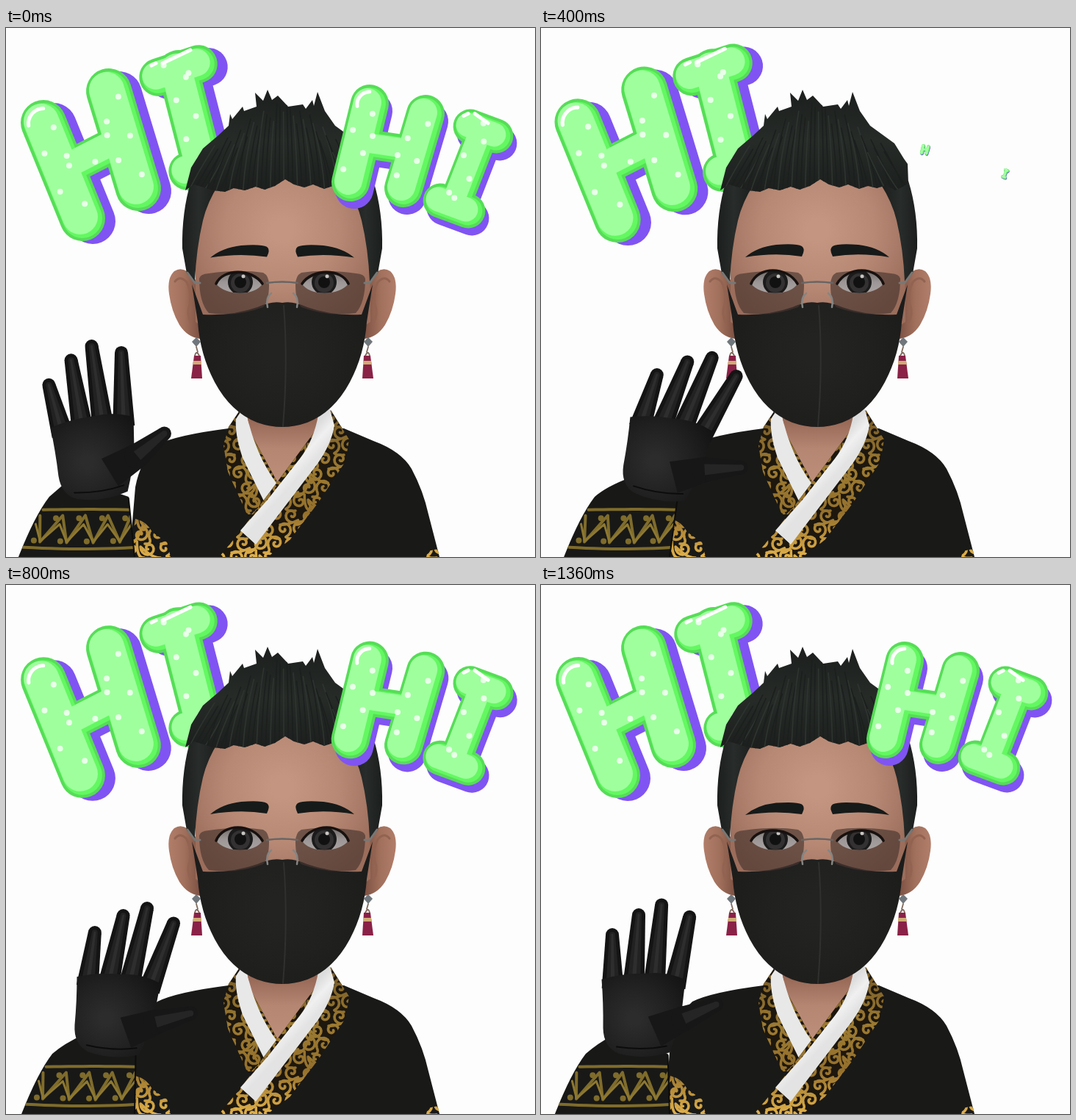
These frames come from a looping animation (720 px wide and 720 px high, 1440 ms). An HTML page with a canvas:

```html
<!DOCTYPE html>
<html lang="en">
<head>
<meta charset="utf-8">
<title>Hi hi</title>
<style>
html, body { margin: 0; width: 100%; height: 100%; overflow: hidden; background: #fdfdfd }
canvas { display: block; width: 720px; height: 720px }
</style>
</head>
<body>
<canvas id="stage" width="720" height="720"></canvas>
<script>
const ctx = document.getElementById('stage').getContext('2d');
const STEP = 80, FRAMES = 18, RAD = Math.PI / 180;
ctx.lineCap = ctx.lineJoin = 'round';

const shape = d => d instanceof Path2D ? d : new Path2D(d);
const fill = (d, color) => { ctx.fillStyle = color; ctx.fill(shape(d)); };
const line = (d, color, width) => { ctx.strokeStyle = color; ctx.lineWidth = width; ctx.stroke(shape(d)); };
const scoped = draw => { ctx.save(); draw(); ctx.restore(); };
const within = (d, draw) => scoped(() => { ctx.clip(shape(d)); draw(); });
const mix = (a, b, u) => a + (b - a) * u;
const both = draw => {
  draw(1);
  scoped(() => { ctx.translate(752, 0); ctx.scale(-1, 1); draw(-1); });
};
function disc(x, y, r, color) {
  ctx.beginPath();
  ctx.arc(x, y, r, 0, 7);
  ctx.fillStyle = color;
  ctx.fill();
}
function shade(gradient, colors) {
  colors.forEach((c, i) => gradient.addColorStop(i / (colors.length - 1), c));
  return gradient;
}
const radial = (x, y, r0, r1, ...colors) => shade(ctx.createRadialGradient(x, y, r0, x, y, r1), colors);
const linear = (x0, y0, x1, y1, ...colors) => shade(ctx.createLinearGradient(x0, y0, x1, y1), colors);

// Linear interpolation through [frame, value] pairs.
function keyed(frame, keys) {
  const i = Math.max(1, keys.findIndex(([at]) => at >= frame));
  const [t0, a] = keys[i - 1], [t1, b] = keys[i];
  return mix(a, b, (frame - t0) / (t1 - t0));
}

// ---- Bubble letters: each is two thick strokes joined by a thinner one ----
const LEFT = {
  start: 3, wide: 62, shadow: [14, 4],
  glyphs: [
    { at: [98, 185], ends: [[51, 129, 104, 259], [140, 86, 180, 218]] },
    { at: [285, 118], ends: [[207, 67, 262, 49], [247, 195, 290, 186]], slim: .83, bar: 56 }
  ]
};
const RIGHT = {
  start: 5, wide: 52, shadow: [5, 10],
  glyphs: [
    { at: [523, 166], ends: [[495, 103, 469, 210], [571, 117, 541, 218]] },
    { at: [632, 199], ends: [[632, 134, 667, 147], [591, 235, 629, 249]], slim: .9, bar: 44 }
  ]
};
const segment = ([x0, y0, x1, y1]) => `M${x0} ${y0}L${x1} ${y1}`;
const middle = ([x0, y0, x1, y1]) => [(x0 + x1) / 2, (y0 + y1) / 2];

// Springs from a speck to full size.
function pop(frames) {
  return frames < 0 ? 0 : 1 - .91 * Math.exp(-.9 * frames) * Math.cos(.85 * frames);
}

function drawLetter({ at: [x, y], ends, slim = 1, bar }, wide, shadow, size) {
  const thick = wide * slim, thin = bar || wide * .77;
  const join = [...middle(ends[0]), ...middle(ends[1])];
  const layer = (color, inset) => {
    ends.forEach(e => line(segment(e), color, thick - inset));
    line(segment(join), color, thin - inset);
  };
  scoped(() => {
    ctx.translate(x, y);
    ctx.scale(size, size);
    ctx.translate(-x, -y);
    scoped(() => { ctx.translate(...shadow); layer('#8054f2', 0); });
    layer('#56dd57', 0);
    layer('#63f861', 8);
    ctx.translate(-3, -2);
    layer('#9fff9d', 14);
    [...ends, join].forEach(([x0, y0, x1, y1]) => {
      const length = Math.hypot(x1 - x0, y1 - y0), count = Math.round(length / 30);
      for (let i = 0; i < count; i++) {
        const u = (i + .5) / count, side = (i % 2 ? 1 : -1) * thick * .2 / length;
        disc(mix(x0, x1, u) - (y1 - y0) * side, mix(y0, y1, u) + (x1 - x0) * side, 4, '#e9ffe9');
      }
    });
    const [x0, y0, x1, y1] = ends[0], r = thick * .33;
    const gloss = new Path2D();
    if (bar) {
      gloss.moveTo(x0 - 6, y0 - r + 3);
      gloss.lineTo(x0, y0 - r);
      gloss.moveTo(x0 + 9, y0 - r);
      gloss.lineTo(x1 - 8, y1 - r);
    } else gloss.arc(x0 + 3, y0 + 3, r, 3, 4.7);
    line(gloss, '#fff', 5);
  });
}

function drawWord({ start, wide, shadow, glyphs }, frame) {
  const size = pop((frame || FRAMES) - start);
  if (size) glyphs.forEach(g => drawLetter(g, wide, shadow, size));
}

// ---- Robe ----
const TORSO = 'M168 720L176 625Q183 588 206 567Q232 554 303 545H460L500 562Q538 576 552 600Q568 630 575 662L590 720Z';
const LAPEL_LEFT = 'M317 522L303 543L296 568L302 604L328 662L356 662L378 634Z';
const LAPEL_RIGHT = 'M442 520L467 560L462 590L425 646L386 697L356 720H290L320 684Z';

function curls(area, x0, y0, x1, y1) {
  const gold = linear(0, 540, 0, 720, '#7d6029', '#9c7a31', '#94702c', '#e0b04a');
  within(area, () => {
    let row = 0;
    for (let y = y0; y < y1; y += 19, row++)
      for (let x = x0 + row % 2 * 11; x < x1; x += 22) {
        const turn = (x * 7 + y * 3) % 6, flip = row % 2 ? -1 : 1;
        const curl = new Path2D();
        for (let a = 0; a < 8; a += .4) {
          const r = 1.5 + a * 1.25, angle = turn + a * flip;
          curl.lineTo(x + r * Math.cos(angle), y + r * Math.sin(angle));
        }
        curl.quadraticCurveTo(x + 6 * flip, y + 14, x + 16 * flip, y + 13);
        line(curl, gold, 3.6);
      }
  });
}

function drawRobe() {
  fill(TORSO, '#191918');
  fill('M326 515H428L426 565L374 634L340 600Z', linear(0, 525, 0, 620, '#8f614f', '#b58672', '#bd8f7b'));
  fill(LAPEL_LEFT, '#1d170e');
  curls(LAPEL_LEFT, 295, 530, 385, 680);
  fill('M323 517L313 532Q311 552 322 585L352 646L376 630Q345 592 331 540Z', '#e8e8e8');
  fill(LAPEL_RIGHT, '#1d170e');
  curls(LAPEL_RIGHT, 290, 530, 475, 735);
  fill('M425 527L440 516L447 541Q443 566 424 593L340 703L319 684L356 642L400 586Q419 561 425 527Z',
    linear(350, 620, 372, 640, '#dcdcdc', '#f0f0f0', '#e3e3e3'));
  curls('M176 668Q192 672 199 686L219 700L224 720H168Z', 172, 670, 230, 725);
  curls('M590 720L588 709L574 712L572 720Z', 570, 708, 596, 724);
}

// ---- Head ----
const HAIR = 'M244 221L252 190L268 164L288 147L303 133L305 117L308 124L322 107L324 113L341 107' +
  'L339 88L350 99L356 84L362 98L370 92L384 107L404 104L408 110L417 98L419 106L424 87L434 113L448 133' +
  'L481 157L494 178L499 185L500 211Q492 217 482 221L470 214L457 218L445 215L433 219L418 213' +
  'L406 217L392 213L380 206L366 215L352 220L340 216L325 221L310 218L298 223L282 221L256 213Z';
const SIDE_HAIR = 'M252 208Q239 250 240 300L246 334L257 345Q259 300 268 262Q274 237 290 212Z';
const LENS = 'M263 341Q264 335 276 334Q318 328 350 333Q358 337 358 350Q358 372 350 380Q312 394 276 388Q263 374 263 341Z';
const MASK = 'M253 349L268 390Q308 392 342 380Q362 371 376 374Q390 371 410 380Q444 392 484 390L499 349L491 400' +
  'Q488 444 468 482Q446 523 410 537Q376 549 342 537Q306 523 284 482Q264 444 261 400Z';
const BROW = 'M278 312Q294 298 320 295Q348 293 355 297Q359 300 357 306L355 311Q318 305 278 312Z';

function drawEar() {
  fill('M258 343Q243 322 229 331Q219 340 222 362Q225 385 236 404Q247 421 264 423L270 380Z',
    linear(222, 0, 264, 0, '#b07d69', '#a1705c', '#7d5142'));
  line('M230 345Q237 336 246 346Q253 360 250 376Q245 388 252 402', '#926351', 3);
  fill('M259 421L265 427L259 434L253 427Z', '#70777c');
  line('M259 434L261 441M257 446Q259 438 263 446', '#806a5c', 1.8);
  fill('M256 446L265 446L267 477L252 477Z', '#8a2147');
  fill('M255 453L266 453L266 458L254 458Z', '#cfab74');
}

function drawEye(open, side) {
  const top = mix(363, 324, open), lid = `M286 348C295 ${top} 335 ${top} 349 348`;
  within(lid + 'C340 365 298 365 286 348Z', () => {
    fill('M280 320H355V370H280Z', linear(0, 330, 0, 362, '#6f6a68', '#9c9796', '#aaa5a4'));
    disc(319, 346, 17, '#1c1b1b');
    disc(319, 347, 13, '#333131');
    disc(319, 346, 8, '#111');
    disc(side > 0 ? 323 : 315, 338, 2.5, '#c8c5c3');
  });
  line(lid, '#17110f', 3.6);
}

function drawHead(open) {
  both(drawEar);
  fill('M258 202H494L496 400L376 480L258 400Z', radial(376, 275, 15, 140, '#c49681', '#b78975', '#9b6d5b'));
  both(() => fill(SIDE_HAIR, linear(240, 0, 285, 0, '#1b1e1c', '#282c2a', '#1d201e')));
  fill(HAIR, linear(0, 85, 0, 222, '#1c1f1d', '#262b28', '#1c1f1d'));
  within(HAIR, () => {
    for (let i = 0; i < 42; i++) {
      const x = 248 + i * 6.2, away = x - 376, top = 90 + Math.abs(away) * .55 + i * 37 % 29;
      line(`M${376 + away * .72} ${top}Q${376 + away * .94} ${top + 45} ${x} 224`,
        i % 3 ? '#1b1f1d' : '#2e3430', 1.6);
    }
  });
  both(() => scoped(() => {
    ctx.translate(0, mix(73, 0, open));
    ctx.scale(1, mix(.79, 1, open));
    fill(BROW, '#161a19');
  }));
  fill(MASK, radial(376, 440, 20, 130, '#232322', '#20201f', '#1c1c1b'));
  line('M378 378Q384 455 377 542', '#30302e', 2);
  both(side => {
    fill(LENS, 'rgba(72,54,48,.66)');
    drawEye(open, side);
    line('M264 347L257 347L247 333', '#777876', 3);
    line('M361 361Q353 367 356 380', '#858583', 2.5);
  });
  line('M355 347Q376 344 397 347', '#686564', 2.5);
}

// ---- Waving arm ----
// The hand circles through three waves; the fingers trail behind the wrist.
const PHASE = [[0, 160], [3, 360], [5, 420], [8, 645], [11, 910], [14, 1080], [17, 1200], [18, 1240]];
const FINGERS = [
  { rest: -16, reach: 160 }, { rest: -3, reach: 183 }, { rest: 6, reach: 199 }, { rest: 18, reach: 193 }
];

function taper(x0, y0, x1, y1, w0, w1, color) {
  const length = Math.hypot(x1 - x0, y1 - y0) * 2, nx = (y0 - y1) / length, ny = (x1 - x0) / length;
  fill(`M${x0 + nx * w0} ${y0 + ny * w0}L${x1 + nx * w1} ${y1 + ny * w1}` +
    `L${x1 - nx * w1} ${y1 - ny * w1}L${x0 - nx * w0} ${y0 - ny * w0}Z`, color);
  disc(x1, y1, w1 / 2, color);
}

function drawSleeve(x, turn) {
  const topX = x - 66 - turn * .7, bottomX = topX - 46, rightX = mix(175, x + 38, .6), rightBottom = 175;
  const at = (u, v) => [mix(mix(topX, bottomX, v), mix(rightX, rightBottom, v), u),
    mix(632, 720, v) + 5 * Math.sin(u * 3) * (v - .4)];
  const rail = (v, n = 12, wobble = 0) => {
    const path = new Path2D();
    for (let i = 0; i <= n; i++) path.lineTo(...at(i / n, v + (i % 2 ? wobble : -wobble)));
    return path;
  };
  const body = `M${bottomX} 720Q${topX - 24} 664 ${topX - 4} 638Q${topX + 12} 624 ${x - 34} 612` +
    `L${rightX} 638L${rightBottom} 720Z`;
  fill(body, '#181817');
  within(body, () => {
    const gold = '#7f6c2b';
    for (const v of [.27, .85]) line(rail(v), gold, 4);
    line(rail(.56, 8, .2), gold, 4);
    line(rail(.62, 8, .13), '#8d7831', 3);
    for (let i = 0; i < 8; i++) disc(...at((i + .5) / 8, i % 2 ? .4 : .74), 4, gold);
  });
  line(`M${rightX} 640L${rightBottom} 720`, '#0d0d0c', 2);
}

function drawHand(x, y, turn) {
  const tilt = (turn * .7 - 3) * RAD, cos = Math.cos(tilt), sin = Math.sin(tilt);
  const place = (px, py) => [x + px * cos - py * sin, y + px * sin + py * cos];
  const tip = (rest, reach) => {
    const angle = (rest + turn) * RAD;
    return [x + reach * Math.sin(angle), y - reach * Math.cos(angle)];
  };
  FINGERS.forEach(({ rest, reach }, i) => {
    const base = place(-34 + 28 * i, -84), end = tip(rest, reach);
    taper(...base, ...end, 30, 18, '#141414');
    taper(...base, ...end, 19, 8, '#222');
    taper(...base, ...end, 6, 3, '#2e2e2e');
  });
  scoped(() => {
    ctx.translate(x, y);
    ctx.rotate(tilt);
    fill('M-49 -96Q-47 -64 -48 -30Q-48 -4 -28 5Q6 15 42 5Q54 -24 60 -56L65 -94Q38 -106 12 -103Q-22 -104 -49 -96Z',
      radial(-6, -42, 8, 85, '#2c2c2c', '#212121', '#141414'));
    line('M-30 -4Q5 2 38 -4', '#0c0c0c', 2);
  });
  const root = place(22, -24), joint = place(62, -41), end = tip(57, 122);
  taper(...root, ...joint, 44, 34, '#171717');
  taper(...joint, ...end, 34, 19, '#171717');
  taper(...joint, ...end, 15, 8, '#252525');
}

// ---- Timeline ----
const BLINK = [[0, .92], [1, 1], [12, 1], [14, 0], [15, .1], [17, .86], [18, .92]];

function render(now) {
  const frame = Math.floor(now / STEP) % FRAMES;
  const phase = keyed(frame, PHASE) * RAD, lag = phase - 60 * RAD;
  const wristX = 144 + 22 * Math.cos(phase);
  const turn = 13 * Math.cos(lag) + 5 * Math.cos(2 * lag) - 1;
  fill('M0 0H720V720H0Z', '#fdfdfd');
  drawWord(LEFT, frame);
  drawRobe();
  drawHead(keyed(frame, BLINK));
  drawWord(RIGHT, frame);
  drawSleeve(wristX, turn);
  drawHand(wristX, 632, turn);
}
const start = performance.now();
function tick() {
  render(performance.now() - start);
  requestAnimationFrame(tick);
}
tick();
</script>
</body>
</html>
```
